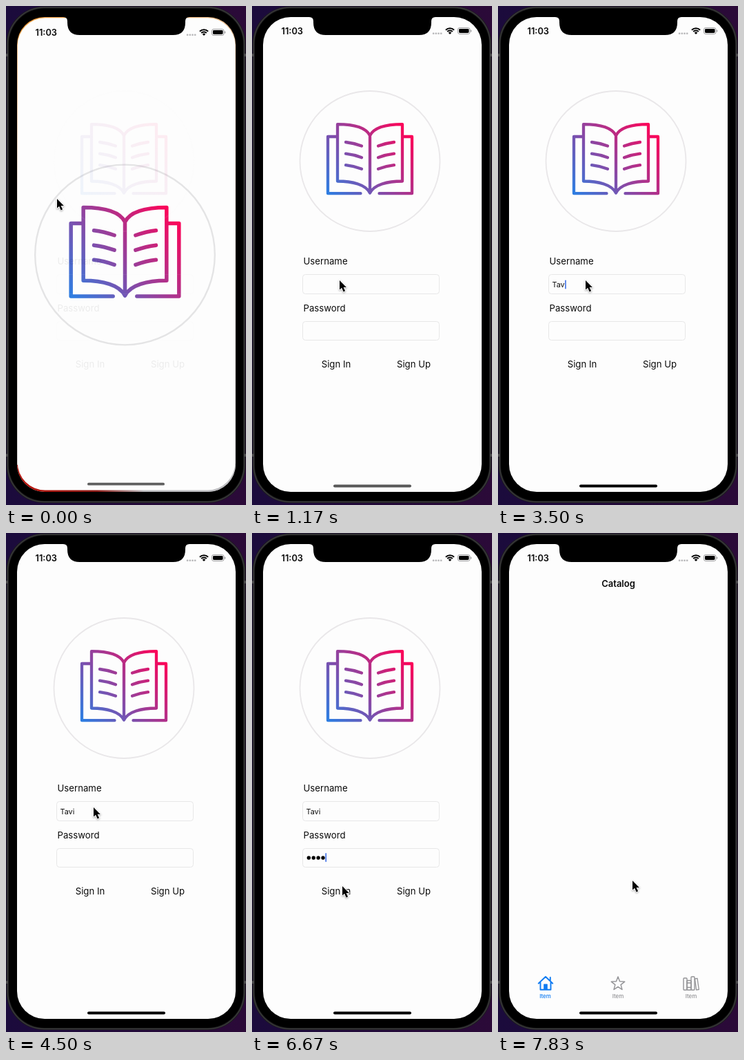
Animation of 348 by 722 pixels, one loop 8 s. Source, as an HTML page with a canvas:

```html
<!DOCTYPE html>
<html lang="en">
<head>
<meta charset="utf-8">
<title>Sign in</title>
<style>
  html, body { margin: 0; width: 100%; height: 100%; overflow: hidden; background: #1a0a30; }
  canvas { display: block; width: 348px; height: 722px; }
</style>
</head>
<body>
<canvas id="stage"></canvas>
<script>
const W = 348, H = 722, LOOP = 8000;
const FONT = 'Inter, "Liberation Sans", sans-serif';
const PAPER = '#fdfdfd';
const USER = 'Tavi';
const USER_KEYS = [3000, 3330, 3500, 3830];
const PASS_KEYS = [5000, 5170, 5330, 5500];

const canvas = document.getElementById('stage');
const ctx = canvas.getContext('2d');
const dpr = window.devicePixelRatio || 1;
canvas.width = W * dpr;
canvas.height = H * dpr;

// Pointer stops: time, x, y
const POINTER = [
  [0, 74, 279], [170, 74, 279], [1000, 127, 397], [5830, 127, 397],
  [6600, 131, 511], [7170, 131, 511], [7800, 195, 503], [LOOP, 195, 503]
];

const clamp = v => Math.max(0, Math.min(1, v));
const ease = v => v * v * (3 - 2 * v);

function fillBox(x, y, w, h, r, color) {
  ctx.beginPath();
  ctx.roundRect(x, y, w, h, r);
  ctx.fillStyle = color;
  ctx.fill();
}

function strokeBox(x, y, w, h, r, color, width = 1) {
  ctx.beginPath();
  ctx.roundRect(x, y, w, h, r);
  ctx.strokeStyle = color;
  ctx.lineWidth = width;
  ctx.stroke();
}

function strokePath(d, color, width) {
  ctx.strokeStyle = color;
  ctx.lineWidth = width;
  ctx.stroke(new Path2D(d));
}

function label(str, x, y, size, { weight = 400, color = '#0a0a0a', align = 'left' } = {}) {
  ctx.font = `${weight} ${size}px ${FONT}`;
  ctx.textAlign = align;
  ctx.fillStyle = color;
  ctx.fillText(str, x, y);
}

function drawBody() {
  const back = ctx.createLinearGradient(0, 0, W, 0);
  back.addColorStop(0, '#1b0b3c');
  back.addColorStop(1, '#2b0a38');
  ctx.fillStyle = back;
  ctx.fillRect(0, 0, W, H);
  fillBox(0.5, 0.5, 347, 718.5, 55, '#1b1b1c');
  strokeBox(2.5, 2, 343, 715.5, 53, '#39393a', 1.5);
  fillBox(4, 3.5, 340, 712.5, 52, '#000');
  ctx.fillStyle = '#4a4a4b';
  for (const y of [69, 648]) {
    ctx.fillRect(0, y, 3, 4);
    ctx.fillRect(345, y, 3, 4);
  }
}

function drawScreen(launching) {
  if (!launching) {
    fillBox(16, 16, 317, 687, 40, PAPER);
    return;
  }
  const edge = ctx.createLinearGradient(16, 16, 333, 703);
  edge.addColorStop(0, '#f29a35');
  edge.addColorStop(0.3, '#e8d8d0');
  edge.addColorStop(1, '#bdbdc0');
  fillBox(16, 16, 317, 687, 40, edge);
  const red = ctx.createLinearGradient(30, 0, 200, 0);
  red.addColorStop(0, '#b8140c');
  red.addColorStop(0.6, '#8d1a16');
  red.addColorStop(1, '#bdbdc0');
  ctx.save();
  ctx.beginPath();
  ctx.rect(16, 664, 317, 40);
  ctx.clip();
  fillBox(16, 16, 317, 687, 40, red);
  ctx.restore();
  fillBox(16.7, 17.2, 315.6, 683.3, 40, PAPER);
}

function drawNotch() {
  ctx.fillStyle = '#000';
  ctx.fill(new Path2D('M83 15H266V16Q260 16 260 22V24Q260 42 242 42H107Q89 42 89 24V22Q89 16 83 16Z'));
}

function drawStatus(dy) {
  ctx.save();
  ctx.translate(0, dy);
  label('11:03', 42.5, 41, 12.8, { weight: 600 });
  for (let i = 0; i < 4; i++) fillBox(261.8 + i * 3.7, 38.6, 2.6, 2.4, 0.8, '#b9b9bb');
  ctx.lineCap = 'butt';
  for (const r of [8.6, 5.4]) {
    ctx.beginPath();
    ctx.arc(287, 40.8, r, -Math.PI * 0.75, -Math.PI * 0.25);
    ctx.strokeStyle = '#000';
    ctx.lineWidth = 2;
    ctx.stroke();
  }
  ctx.beginPath();
  ctx.moveTo(287, 41);
  ctx.arc(287, 41, 3.2, -Math.PI * 0.75, -Math.PI * 0.25);
  ctx.fillStyle = '#000';
  ctx.fill();
  strokeBox(298.5, 31.5, 17.5, 9, 2.6, '#9c9c9e');
  fillBox(300, 33, 14.5, 6, 1.4, '#000');
  fillBox(317, 34.5, 1.2, 3, 0.6, '#9c9c9e');
  ctx.restore();
}

function drawBook(x, y, scale, ring) {
  ctx.save();
  ctx.translate(x, y);
  ctx.scale(scale, scale);
  ctx.beginPath();
  ctx.arc(0, 0, 101.5, 0, Math.PI * 2);
  ctx.strokeStyle = ring;
  ctx.lineWidth = 1.8;
  ctx.stroke();

  const ink = ctx.createLinearGradient(-60, 46, 52, -46);
  ink.addColorStop(0, '#2f7de1');
  ink.addColorStop(1, '#fb0559');
  ctx.lineCap = ctx.lineJoin = 'round';
  const half = s => {
    const p = (px, py) => `${s * px} ${py} `;
    let d = `M${p(0, -37)}C${p(6, -49)}${p(25, -53.3)}${p(47, -53.3)}L${p(47, 29)}` +
      `C${p(25, 29)}${p(6, 34)}${p(0, 46)}` +
      `M${p(49, -35.5)}L${p(61, -35.5)}L${p(61, 46.7)}L${p(13.5, 46.7)}`;
    for (const row of [-27.5, -10.8, 5.7]) d += `M${p(35, row)}Q${p(24, row + 1.2)}${p(12, row + 5.5)}`;
    return d;
  };
  strokePath(half(-1) + half(1) + 'M0 -37V46', ink, 4.3);
  ctx.restore();
}

function drawCaret(x, y) {
  fillBox(x, y - 6.5, 1.6, 13, 0.8, '#3d6fe6');
}

function caretOn(t, from, keys) {
  const last = keys.filter(k => k <= t).pop() || from;
  return (t - last) % 1000 < 500;
}

function drawLogin(t) {
  drawBook(171, 224.5, 1, '#e9e7e9');
  label('Username', 74.5, 374, 13.2);
  label('Password', 74.5, 441.5, 13.2);
  strokeBox(73.5, 388.5, 198, 28, 4, '#e7e7e8');
  strokeBox(73.5, 456.5, 198, 27, 4, '#e7e7e8');
  label('Sign In', 122, 523, 13.2, { align: 'center' });
  label('Sign Up', 234.5, 523, 13.2, { align: 'center' });

  const typed = USER.slice(0, USER_KEYS.filter(k => k <= t).length);
  label(typed, 78.5, 407, 10.8);
  if (t >= 2500 && t < 4660 && caretOn(t, 2500, USER_KEYS)) {
    drawCaret(79 + ctx.measureText(typed).width, 403);
  }

  const dots = PASS_KEYS.filter(k => k <= t).length;
  for (let i = 0; i < dots; i++) {
    ctx.beginPath();
    ctx.arc(82.3 + i * 6.9, 470, 2.7, 0, Math.PI * 2);
    ctx.fillStyle = '#000';
    ctx.fill();
  }
  if (t >= 4660 && caretOn(t, 4660, PASS_KEYS)) drawCaret(78.8 + dots * 6.9, 469.5);
}

function starPath(cx, cy, outer, inner) {
  let d = '';
  for (let i = 0; i < 10; i++) {
    const r = i % 2 ? inner : outer, a = i * Math.PI / 5 - Math.PI / 2;
    d += `${i ? 'L' : 'M'}${cx + r * Math.cos(a)} ${cy + r * Math.sin(a)}`;
  }
  return d + 'Z';
}

function drawCatalog() {
  const blue = '#0f7bf2', gray = '#929295';
  label('Catalog', 174.5, 78, 13, { weight: 600, align: 'center' });
  ctx.lineCap = ctx.lineJoin = 'round';
  strokePath('M58.7 651.7L69 642L79.3 651.7M61.5 650V660.8H76.5V650M75.8 647.5V643', blue, 1.9);
  fillBox(66.2, 652.5, 5.6, 8.5, 0.8, blue);
  strokePath(starPath(174, 652.3, 10.3, 4.3), gray, 1.4);
  strokeBox(269, 644, 5, 17.3, 1, gray, 1.4);
  strokeBox(274, 647.5, 6, 13.8, 1, gray, 1.4);
  strokeBox(280, 642, 5, 19.3, 1, gray, 1.4);
  strokePath('M285.5 645L289 644.3L291.3 660.5L287.6 661.2ZM274.5 651H279.5M274.5 657.5H279.5', gray, 1.3);
  [68.5, 174, 280].forEach((x, i) =>
    label('Item', x, 673, 8, { weight: 500, color: i ? gray : blue, align: 'center' }));
}

function drawPointer(t) {
  const i = POINTER.findIndex((p, n) => n > 0 && t <= p[0]);
  const [t0, x0, y0] = POINTER[i - 1], [t1, x1, y1] = POINTER[i];
  const k = ease(clamp((t - t0) / (t1 - t0)));
  ctx.save();
  ctx.translate(x0 + (x1 - x0) * k, y0 + (y1 - y0) * k);
  const arrow = new Path2D('M0 0V13.6L3.1 10.8L5.6 16.4L8.1 15.3L5.6 9.9H9.9Z');
  ctx.shadowColor = 'rgba(0,0,0,.35)';
  ctx.shadowBlur = 2.5 * dpr;
  ctx.shadowOffsetY = dpr;
  ctx.strokeStyle = '#fff';
  ctx.lineWidth = 1.8;
  ctx.lineJoin = 'round';
  ctx.stroke(arrow);
  ctx.shadowColor = 'transparent';
  ctx.fillStyle = '#000';
  ctx.fill(arrow);
  ctx.restore();
}

function withAlpha(a, draw) {
  if (a <= 0) return;
  ctx.save();
  ctx.globalAlpha = a;
  draw();
  ctx.restore();
}

function render(time) {
  const t = Math.floor((time + 5) * 0.006) / 0.006;
  const launching = t < 160;
  const shown = 0.07 + 0.93 * ease(clamp(t / 330));

  ctx.setTransform(dpr, 0, 0, dpr, 0, 0);
  drawBody();
  drawScreen(launching);
  if (t >= 7320) {
    drawCatalog();
  } else {
    if (shown < 1) withAlpha(launching ? 1 : 1 - shown, () => drawBook(172.5, 360, 1.284, '#e4e4e5'));
    withAlpha(shown, () => drawLogin(t));
  }
  drawNotch();
  drawStatus(launching ? 2 : 0);

  const tone = Math.round(95 * (1 - clamp((t - 1100) / 900)));
  const bar = `rgb(${tone},${tone},${tone})`;
  if (launching) fillBox(118, 689.8, 112, 3.8, 1.9, bar);
  else fillBox(118, 692.5, 113, 4, 2, bar);
  drawPointer(t);
}

function tick(now) {
  render(now % LOOP);
  requestAnimationFrame(tick);
}
render(0);
requestAnimationFrame(tick);
</script>
</body>
</html>
```
